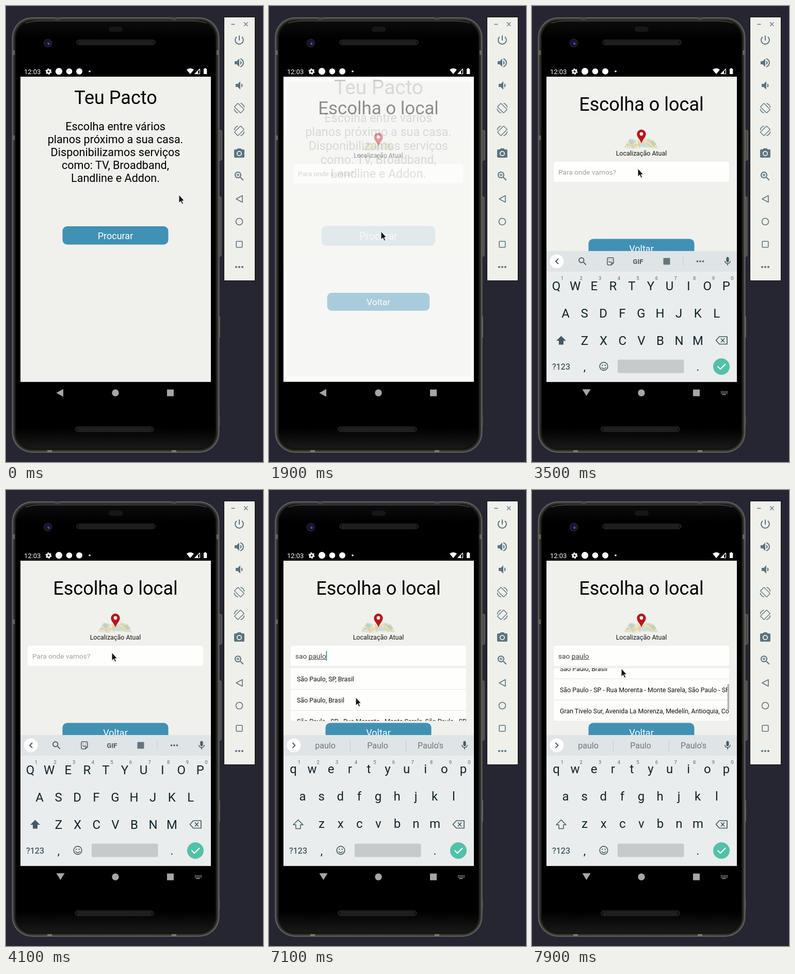
These frames come from a looping animation (498 px wide and 884 px high, 8000 ms). An HTML page:

```html
<!DOCTYPE html>
<html lang="pt">
<head>
<meta charset="utf-8">
<title>Busca de planos</title>
<style>
  html, body { margin: 0; width: 100%; height: 100%; overflow: hidden; background: #252631; }
  svg { display: block; width: 498px; height: 884px; font-family: Roboto, "Liberation Sans", sans-serif; }
  text { white-space: pre; }
  .mid { text-anchor: middle; }
  .line { fill: none; stroke-linecap: round; stroke-linejoin: round; }
</style>
</head>
<body>
<svg id="stage" viewBox="0 0 498 884"></svg>
<script>
const LOOP = 8000, STEP = 100;
const PAPER = '#f0f1ec', BLUE = '#4191b4', SLATE = '#5a7482', INK = '#12232c', KEY = '#455a64';

const text = (x, y, size, s, fill = '#000', extra = 'class="mid"') =>
  `<text x="${x}" y="${y}" font-size="${size}" fill="${fill}" ${extra}>${s}</text>`;
const rect = (x, y, w, h, fill, r = 0, extra = '') =>
  `<rect x="${x}" y="${y}" width="${w}" height="${h}" rx="${r}" fill="${fill}" ${extra}/>`;
const dot = (x, y, r, fill, extra = '') => `<circle cx="${x}" cy="${y}" r="${r}" fill="${fill}" ${extra}/>`;
const line = (d, color, w = 2) => `<path class="line" d="${d}" stroke="${color}" stroke-width="${w}"/>`;
const fill = (d, color) => `<path d="${d}" fill="${color}"/>`;
const at = (x, y, body, scale = 1) => `<g transform="translate(${x} ${y}) scale(${scale})">${body}</g>`;
// 24-unit icon centred on a point
const icon = (x, y, d, color, scale = 1) => at(x - 12 * scale, y - 12 * scale, fill(d, color), scale);
const clip = (id, x, y, w, h) => `<clipPath id="${id}">${rect(x, y, w, h, '#000')}</clipPath>`;

const ICONS = {
  power: 'M13 3h-2v10h2V3zm4.83 2.17l-1.42 1.42C17.99 7.86 19 9.81 19 12c0 3.87-3.13 7-7 7s-7-3.13-7-7c0-2.19 1.01-4.14 2.58-5.42L6.17 5.17C4.23 6.82 3 9.26 3 12c0 4.97 4.03 9 9 9s9-4.03 9-9c0-2.74-1.23-5.18-3.17-6.83z',
  loud: 'M3 9v6h4l5 5V4L7 9H3zm13.5 3c0-1.77-1.02-3.29-2.5-4.03v8.05c1.48-.73 2.5-2.25 2.5-4.02zM14 3.23v2.06c2.89.86 5 3.54 5 6.71s-2.11 5.85-5 6.71v2.06c4.01-.91 7-4.49 7-8.77s-2.99-7.86-7-8.77z',
  quiet: 'M18.5 12c0-1.77-1.02-3.29-2.5-4.03v8.05c1.48-.73 2.5-2.25 2.5-4.02zM5 9v6h4l5 5V4L9 9H5z',
  rotate: 'M10.23 1.75c-.59-.59-1.54-.59-2.12 0L1.75 8.11c-.59.59-.59 1.54 0 2.12l12.02 12.02c.59.59 1.54.59 2.12 0l6.36-6.36c.59-.59.59-1.54 0-2.12L10.23 1.75zm4.6 19.44L2.81 9.17l6.36-6.36 12.02 12.02-6.36 6.36z',
  camera: 'M9 2L7.17 4H4c-1.1 0-2 .9-2 2v12c0 1.1.9 2 2 2h16c1.1 0 2-.9 2-2V6c0-1.1-.9-2-2-2h-3.17L15 2H9zm3 15c-2.76 0-5-2.24-5-5s2.24-5 5-5 5 2.24 5 5-2.24 5-5 5z',
  search: 'M15.5 14h-.79l-.28-.27C15.41 12.59 16 11.11 16 9.5 16 5.91 13.09 3 9.5 3S3 5.91 3 9.5 5.91 16 9.5 16c1.61 0 3.09-.59 4.23-1.57l.27.28v.79l5 4.99L20.49 19l-4.99-5zm-6 0C7.01 14 5 11.99 5 9.5S7.01 5 9.5 5 14 7.01 14 9.5 11.99 14 9.5 14z',
  mic: 'M12 14c1.66 0 3-1.34 3-3V5c0-1.66-1.34-3-3-3S9 3.34 9 5v6c0 1.66 1.34 3 3 3zm5.3-3c0 3-2.54 5.1-5.3 5.1S6.7 14 6.7 11H5c0 3.41 2.72 6.23 6 6.72V21h2v-3.28c3.28-.48 6-3.3 6-6.72h-1.7z'
};

const dots = (x, y, gap, r, color) => [-1, 0, 1].map(i => dot(x + i * gap, y, r, color)).join('');

function speaker(x, y) {
  return rect(x, y, 152, 9, '#111', 4.5, 'stroke="#3d3d3d"') +
    `<path d="M${x + 5} ${y + 3.2}h142M${x + 5} ${y + 6}h142" stroke="#454545" stroke-width="1.4" stroke-dasharray="1.5 1.5"/>`;
}

function phone() {
  // soft rim: nested bodies fading from grey to black
  const rim = [104, 78, 58, 44, 30, 16].map((g, i) =>
    rect(11.5 + 1.3 * i, 22 + 1.3 * i, 402 - 2.6 * i, 844 - 2.6 * i, `rgb(${g},${g},${g - 4})`, 39 - 1.3 * i)).join('');
  return rect(412, 241, 6, 58, '#4a4a46', 2, 'stroke="#77776f"') +
    rect(412, 370, 5, 115, '#4a4a46', 2, 'stroke="#77776f"') +
    rect(412, 602, 3, 41, '#5a5a55') + rect(412, 793, 3, 20, '#3a3a38') +
    rim + rect(19.5, 30, 386, 828, 'url(#face)', 32) +
    line('M38 33Q48 29.5 62 29H362Q378 29.5 388 33', '#62625c', 1) +
    [[12, 86], [12, 251], [408, 86]].map(([x, y]) => rect(x, y, 5, 9, '#63635e')).join('') +
    rect(95, 22, 9, 5, '#4a4a46') + rect(321, 22, 9, 5, '#4a4a46') +
    rect(80, 861, 9, 4, '#77776f') + rect(321, 861, 9, 4, '#77776f') +
    rect(199, 40, 27, 10, '#171717', 5) +
    dot(81, 72, 8.5, '#1d1d24') + dot(81, 72, 5.5, '#11112b') + dot(82, 72, 3, '#23237a') + dot(82.5, 73.5, 1.3, '#7d84f2') +
    speaker(137, 66) + speaker(134, 816);
}

function statusBar() {
  return text(35, 131.5, 13, '12:03', '#fff', '') +
    dot(82.5, 127, 3.3, 'none', 'stroke="#fff" stroke-width="2.6"') +
    dot(82.5, 127, 5, 'none', 'stroke="#fff" stroke-width="2" stroke-dasharray="2.6 2.636"') +
    dot(102.5, 126.7, 6.6, '#fff') + dot(122.5, 126.7, 5.8, '#fff') + dot(142, 126.7, 6, '#fff') + dot(162, 126.7, 1.8, '#fff') +
    fill('M350 123.5Q357 118 364 123.5L357 132Z', '#fff') +
    line('M366 131.5H375.5V122Z', '#fff', 1.2) + fill('M366 132L372 126V132Z', '#fff') +
    fill('M383 122h1.5v-1.5h3v1.5h1.8v10h-6.3z', '#fff');
}

function sidePanel() {
  const turn = flip => `<g transform="scale(${flip} 1)">` + icon(0, 0, ICONS.rotate, SLATE, .92) +
    line('M3 -9.2A10 10 0 0 1 9.6 -2M-3 9.2A10 10 0 0 1 -9.6 2', SLATE, 1.5) + '</g>';
  return rect(422.5, 21.5, 60, 511, '#eff0ea', 0, 'stroke="#0c0c10"') +
    line('M437 35.5H443', SLATE, 1.3) + line('M461.5 32L468 38.5M468 32L461.5 38.5', SLATE, 1.3) +
    icon(452, 66, ICONS.power, SLATE, .98) + icon(452, 110, ICONS.loud, SLATE) + icon(452, 154, ICONS.quiet, SLATE) +
    at(452, 198, turn(1)) + at(452, 242, turn(-1)) +
    icon(452, 286, ICONS.camera, SLATE) + dot(452, 286, 3.2, SLATE) +
    icon(452, 330, ICONS.search, SLATE) + line('M447 327.5h5M449.5 325v5', SLATE, 1.3) +
    line('M446 374L458 367.5V380.5Z', SLATE, 1.6) +
    dot(452, 418, 6.5, 'none', `stroke="${SLATE}" stroke-width="1.6"`) +
    rect(446.2, 456.2, 11.6, 11.6, 'none', 1, `stroke="${SLATE}" stroke-width="1.6"`) +
    dots(452, 506, 6, 2.1, SLATE);
}

function navBar() {
  const c = '#a6a6a6';
  return `<g id="navBack">${fill('M97.5 750L111 742.5V757.5Z', c)}</g>` +
    `<g id="navDown">${fill('M97.5 743H113.5L105.5 756Z', c)}` +
    `<path d="M366 747.5h13M366 750.3h13" stroke="${c}" stroke-width="1.7" stroke-dasharray="1.8 1"/>` +
    line('M369 753.3H375', c, 1.4) + '</g>' +
    dot(212, 750, 6.7, c) + rect(312, 743.5, 13, 13, c);
}

function home() {
  const lines = ['Escolha entre vários', 'planos próximo a sua casa.', 'Disponibilizamos serviços',
    'como: TV, Broadband,', 'Landline e Addon.'];
  return rect(28, 137, 369, 592, PAPER) + text(212.5, 190, 36, 'Teu Pacto') +
    lines.map((s, i) => text(212, 240.5 + 25 * i, 21.6, s)).join('') +
    rect(109.5, 427, 205, 35.5, BLUE, 9) + text(212, 452, 18, 'Procurar', '#fff');
}

function mapPicture() {
  return fill('M178 275L189 257L203 260L200 277Z', '#dfe3d3') + fill('M200 277L203 260L221 256L224 274Z', '#eee9d6') +
    fill('M224 274L221 256L235 260L245 276Z', '#dce0d0') +
    fill('M186 262L194 258L200 263L193 268Z', '#b7d3e4') + fill('M205 272L212 264L223 268L224 274Z', '#c9dde0') +
    fill('M229 263L236 261L241 269L233 271Z', '#bcd9c3') +
    line('M181 272L192 265L201 270L213 262L222 266L232 274M190 258L196 276M226 258L238 274M206 260L209 275', '#e6c85f', 1.1) +
    line('M184 268L200 273L222 260L240 268', '#c9b5a0', .7) +
    fill('M212 266C210 259 203.3 255 203.3 248.3A8.7 8.7 0 0 1 220.7 248.3C220.7 255 214 259 212 266Z', '#b9141b') +
    dot(212, 248, 3.4, '#f6efec');
}

function place() {
  return rect(28, 137, 369, 592, PAPER) + text(212, 203, 36, 'Escolha o local') + mapPicture() +
    text(212, 289.5, 12.5, 'Localização Atual', '#161616') +
    rect(42, 302, 340, 39, '#fefefc', 4) +
    text(51, 327, 13.7, '', '#222', 'id="typed"') +
    `<path id="underline" stroke="#444"/>` + rect(0, 312, 1.7, 19, '#2f8ba0', 0, 'id="caret"') +
    `<g id="back">${rect(109.5, 560, 205, 36, BLUE, 9)}${text(212, 585, 18, 'Voltar', '#fff')}</g>` +
    `<g id="list" clip-path="url(#listClip)">${rect(42, 345.5, 340, 102, '#fefefc', 3)}<g id="rows"></g>` +
    rect(378.7, 346, 3.3, 50, '#b1b1b1', 0, 'id="bar"') + '</g>';
}

function letters(rows, drop) {
  return rows.map(([s, x, y]) => [...s].map((c, i) => text(x + 36.6 * i, y - drop, 24, c, INK)).join('')).join('');
}

function keyboard() {
  const rows = [['QWERTYUIOP', 47, 551], ['ASDFGHJKL', 65, 604], ['ZXCVBNM', 102, 657]];
  const small = rows.map(([s, x, y]) => [s.toLowerCase(), x, y]);
  const arrow = 'M56.5 639.5L66 649H61V656.5H52V649H47Z';
  const tools = icon(98, 495, ICONS.search, KEY, .87) +
    line('M158 498V490Q158 488 156 488H148Q146 488 146 490V500Q146 502 148 502H154L158 498H154V502M149 492h.1M155 492h.1M149 495.5Q151 498 154 495.5', KEY, 1.5) +
    text(205.5, 499.5, 13, 'GIF', KEY, 'class="mid" font-weight="700"') +
    rect(254.5, 488.5, 13, 13, '#65757d', 1) + rect(292.5, 486, 1, 18, '#c7cdd0') + dots(326, 495, 5.5, 1.8, KEY);
  return rect(28, 475, 369, 254, '#e9eded') + rect(28, 475, 369, 40, '#dfe4e6') +
    dot(48, 495, 13.5, '#fff') + icon(379, 495, ICONS.mic, KEY, .85) +
    `<g id="capsMode">${tools}${line('M50.5 490.5L46 495L50.5 499.5', KEY, 1.8)}${letters(rows, 0)}${fill(arrow, KEY)}</g>` +
    `<g id="wordMode">${line('M46 490.5L50.5 495L46 499.5', KEY, 1.8)}${letters(small, 2)}${line(arrow, KEY, 1.5)}` +
    rect(157, 485, 1, 22, '#c3c9cc') + rect(265, 485, 1, 22, '#c3c9cc') +
    [109, 210.5, 313].map((x, i) => text(x, 501, 16, '', '#6a777e', `class="mid" id="word${i}"`)).join('') + '</g>' +
    [...'1234567890'].map((c, i) => text(58.5 + 36.6 * i, 531, 9.5, c, '#546871')).join('') +
    line('M363 641H378V655.5H363L356.5 648.2ZM366.5 645L372.5 651.5M372.5 645L366.5 651.5', KEY, 1.7) +
    text(56.5, 704.5, 16, '?123', KEY, 'class="mid" font-weight="500"') + text(102, 707, 22, ',', INK) + text(321.5, 707, 22, '.', INK) +
    dot(139, 698.5, 7.8, 'none', `stroke="${KEY}" stroke-width="1.7"`) + dot(136.3, 696.5, 1.2, KEY) + dot(141.7, 696.5, 1.2, KEY) +
    line('M135 701Q139 705 143 701', KEY, 1.4) +
    rect(166, 685.5, 128.5, 26, '#c6cacb', 3) +
    dot(367, 699, 16, '#52c1a8') + line('M360 699L365 704L374.5 694.5', '#fff', 2);
}

document.getElementById('stage').innerHTML =
  `<defs>${clip('screenClip', 28, 137, 369, 591.5)}${clip('listClip', 42, 345.5, 340, 102)}
  <linearGradient id="face" x2="0" y2="1"><stop stop-color="#0c0c0c"/><stop offset=".04" stop-color="#000"/><stop offset=".95" stop-color="#000"/><stop offset="1" stop-color="#191918"/></linearGradient></defs>` +
  rect(0, 0, 498, 884, '#252631') + phone() + statusBar() + navBar() + sidePanel() +
  `<g clip-path="url(#screenClip)">${rect(28, 137, 369, 592, '#fff')}<g id="home">${home()}</g><g id="place">${place()}</g><g id="keys">${keyboard()}</g></g>` +
  `<path id="cursor" d="M0 0V16L3.7 12.6L6.2 18.2L8.7 17.2L6.3 11.7H10.8Z" fill="#161616" stroke="#fff" stroke-width="1"/>`;

const el = {};
document.querySelectorAll('[id]').forEach(n => el[n.id] = n);

// Each track: time followed by its values
const CURSOR = [[800, 335, 366], [900, 318, 373], [1000, 286, 392], [1100, 260, 403], [1200, 294, 405], [1300, 294, 405],
  [1600, 217, 437], [2400, 217, 437], [2600, 217, 398], [2700, 217, 398], [2800, 217, 385], [3100, 205, 315],
  [6800, 205, 315], [7000, 174, 391], [7100, 168, 402], [7300, 170, 405], [7400, 170, 400], [7700, 172, 358], [7900, 173, 346]];
// outgoing scale, outgoing opacity, incoming scale, incoming opacity
const SWITCH = [[1700, 1, 1, .85, 0], [1800, 1.05, .64, .925, 0], [1900, 1.078, .22, .968, .44],
  [2000, 1.093, .1, .989, 1], [2100, 1.098, .02, .996, 1], [2300, 1.1, 0, 1, 1]];
const KEYS_Y = [[3100, 254], [3200, 190], [3300, 80], [3400, 20], [3500, 0]];
const SCROLL = [[7300, 0], [7400, 4], [7700, 47], [7900, 61.5]];
const BAR = [[4700, 0], [4800, 1], [5800, 1], [6200, 0], [7300, 0], [7400, 1]];
const TYPING = [[4400, 's', 's', 'S', 'so'], [4700, 'sa', 'sa', 'Sa', 'say'], [4900, 'sao', 'sao', 'São', 'Sao'],
  [5000, 'sao ', 'do', 'e', 'de'], [5100, 'sao p', 'p', 'P', 'pm'], [5200, 'sao pa', 'pa', 'PA', 'pay'],
  [5400, 'sao pau', 'pau', 'Pau', 'paul'], [5900, 'sao paul', 'paul', 'Paul', "Paul's"], [6000, 'sao paulo', 'paulo', 'Paulo', "Paulo's"]];
const FIRST = ['Suez Canal, Egito', 'Sydney Nova Gales do Sul, Austrália', 'San Diego, CA, EUA', 'Salvador, BA, Brasil', 'Santiago, Chile'];
const SECOND = ['São Paulo, SP, Brasil', 'São Paulo, Brasil', 'São Paulo - SP - Rua Morenta - Monte Sarela, São Paulo - SP, Brasil',
  'Gran Tivelo Sur, Avenida La Morenza, Medelín, Antioquia, Colômbia', 'São Paulo, Portugal'];

function track(rows, t) {
  const next = rows.findIndex(r => r[0] > t);
  if (next < 0) return rows[rows.length - 1].slice(1);
  if (next === 0) return rows[0].slice(1);
  const a = rows[next - 1], b = rows[next], k = (t - a[0]) / (b[0] - a[0]);
  return a.slice(1).map((v, i) => v + (b[i + 1] - v) * k);
}
const show = (node, on) => node.setAttribute('visibility', on ? 'inherit' : 'hidden');
const move = (node, x, y) => node.setAttribute('transform', `translate(${x} ${y})`);
function card(node, scale, opacity) {
  node.setAttribute('transform', `translate(212.5 433) scale(${scale}) translate(-212.5 -433)`);
  node.setAttribute('opacity', opacity);
}

function drawInput(t) {
  const entry = TYPING.filter(r => r[0] <= t).pop();
  el.typed.textContent = entry ? entry[1] : 'Para onde vamos?';
  el.typed.setAttribute('fill', entry ? '#3a3a3a' : '#a2a2a2');
  const width = entry ? el.typed.getComputedTextLength() : 0;
  let start = 0;
  if (entry) {
    const cut = entry[1].lastIndexOf(' ') + 1;
    if (cut) start = el.typed.getSubStringLength(0, cut);
    entry.slice(2).forEach((s, i) => el['word' + i].textContent = s);
  }
  el.underline.setAttribute('d', `M${51 + start} 328.5H${51 + width}`);
  show(el.underline, width > start + 1);
  const since = entry ? t - entry[0] : t - 3600;
  show(el.caret, t >= 3600 && since % 1000 < 500);
  el.caret.setAttribute('x', 51 + width);
  show(el.capsMode, !entry);
  show(el.wordMode, !!entry);
}

function drawList(t) {
  show(el.list, t >= 4800);
  const [scroll] = track(SCROLL, t);
  el.rows.innerHTML = (t < 5500 ? FIRST : SECOND).map((s, i) =>
    text(54, 371 + 41 * i, 12.4, s, '#111', '') + rect(42, 386 + 41 * i, 340, 1, '#e5e5e2')).join('');
  move(el.rows, 0, -scroll);
  move(el.bar, 0, scroll * .49);
  el.bar.setAttribute('opacity', track(BAR, t)[0]);
}

let last = -1;
function draw(now) {
  const t = Math.floor(now % LOOP / STEP) * STEP;
  if (t !== last) {
    last = t;
    const [outScale, outAlpha, inScale, inAlpha] = track(SWITCH, t);
    card(el.home, outScale, outAlpha);
    card(el.place, inScale, inAlpha);
    move(el.cursor, ...track(CURSOR, t));
    move(el.keys, 0, track(KEYS_Y, t)[0]);
    move(el.back, 0, t >= 3300 ? -108.5 : 0);
    show(el.keys, t >= 3200);
    show(el.navBack, t < 3200);
    show(el.navDown, t >= 3200);
    drawInput(t);
    drawList(t);
  }
  requestAnimationFrame(() => draw(performance.now() - begin));
}
const begin = performance.now();
draw(0);
</script>
</body>
</html>
```
